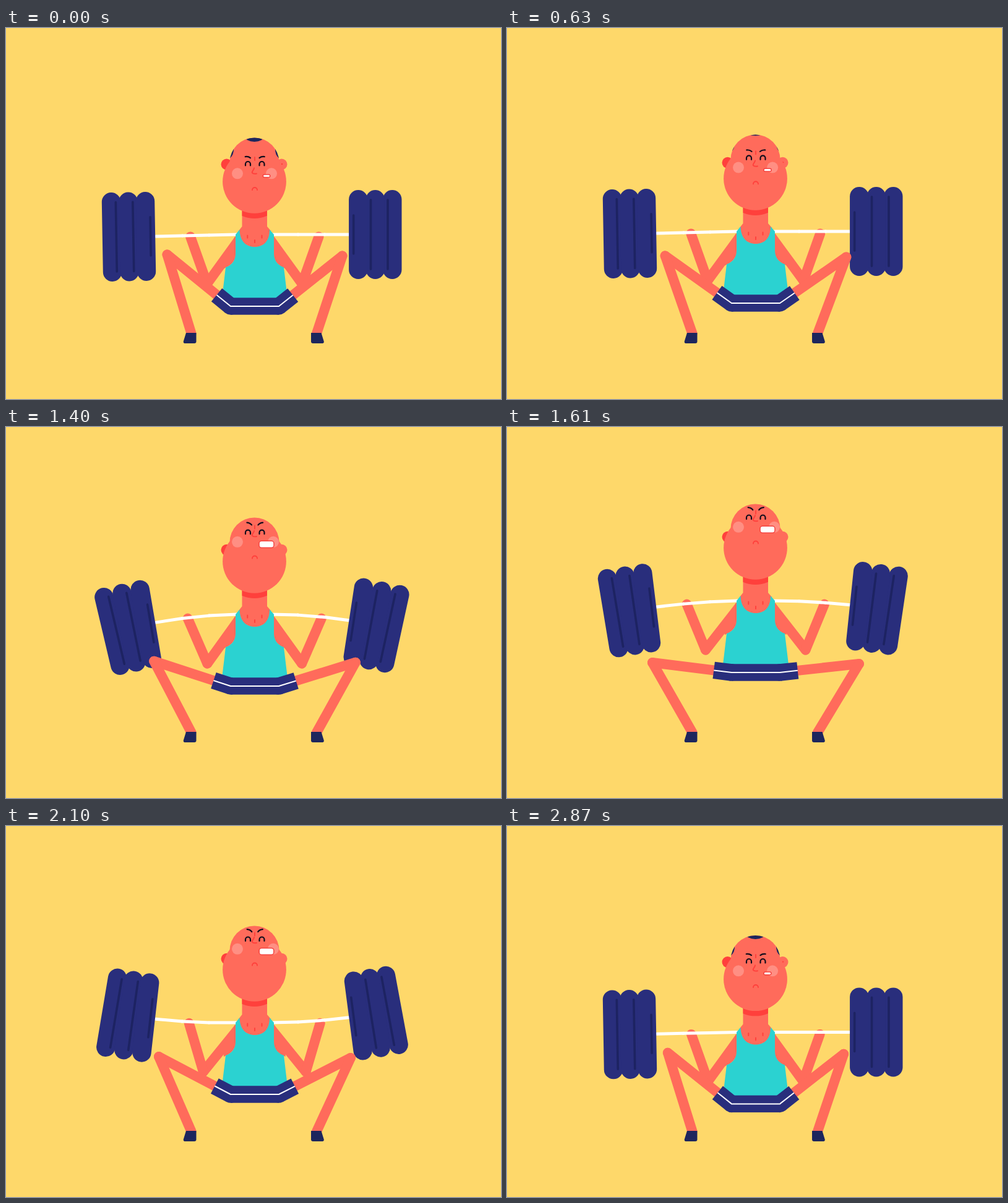
An HTML page without scripts for the animation above (2940 ms loop, 800x600 px).

```html
<!DOCTYPE html>
<html lang="en">
<head>
<meta charset="utf-8">
<title>Squat</title>
<style>
/* y: body height, a: bar bend in degrees, p: head tilt, g: grit of the teeth */
@property --y { syntax: "<number>"; inherits: true; initial-value: 0; }
@property --a { syntax: "<number>"; inherits: true; initial-value: 0; }
@property --p { syntax: "<number>"; inherits: true; initial-value: 0; }
@property --g { syntax: "<number>"; inherits: true; initial-value: 0; }

html, body { margin: 0; width: 100%; height: 100%; overflow: hidden; background: #fed86a; }
svg {
  display: block; width: 100%; height: 100%;
  animation: squat 2940ms -2ms infinite, strain 2940ms -2ms infinite;
}

/* One step lasts 70 ms. */
@keyframes squat {
  0%       { --y: 0;    --a: 0;     animation-timing-function: steps(9); }
  21.428%  { --y: -5;   --a: 0;     animation-timing-function: steps(3); }
  28.571%  { --y: -7;   --a: 0;     animation-timing-function: steps(4); }
  38.095%  { --y: -4;   --a: 2.2;   animation-timing-function: steps(2); }
  42.857%  { --y: -11;  --a: 7;     animation-timing-function: steps(2); }
  47.619%  { --y: -31;  --a: 10.2;  animation-timing-function: steps(2); }
  52.38%   { --y: -49;  --a: 8.6;   animation-timing-function: steps(1); }
  54.761%  { --y: -53;  --a: 7;     animation-timing-function: steps(1); }
  57.142%  { --y: -55;  --a: 4.5;   animation-timing-function: steps(1); }
  59.523%  { --y: -54;  --a: 1;     animation-timing-function: steps(2); }
  64.285%  { --y: -43;  --a: -7;    animation-timing-function: steps(2); }
  69.047%  { --y: -25;  --a: -10.5; animation-timing-function: steps(1); }
  71.428%  { --y: -16;  --a: -8.75; animation-timing-function: steps(2); }
  76.19%   { --y: 1;    --a: -4;    animation-timing-function: steps(1); }
  78.571%  { --y: 7;    --a: -.6;   animation-timing-function: steps(1); }
  80.952%  { --y: 10;   --a: 2.2;   animation-timing-function: steps(1); }
  83.333%  { --y: 10;   --a: 3.2;   animation-timing-function: steps(2); }
  88.095%  { --y: 5;    --a: 1.5;   animation-timing-function: steps(2); }
  92.857%  { --y: 0;    --a: 0;     animation-timing-function: steps(1); }
  95.238%  { --y: -1.2; --a: 0;     animation-timing-function: steps(2); }
  100%     { --y: 0;    --a: 0; }
}
@keyframes strain {
  0%      { --p: 0;   --g: 0;   animation-timing-function: steps(9); }
  21.428% { --p: .23; --g: .06; animation-timing-function: steps(3); }
  28.571% { --p: .36; --g: .3;  animation-timing-function: steps(4); }
  38.095% { --p: .56; --g: 1;   animation-timing-function: steps(4); }
  47.619% { --p: .9;  --g: 1;   animation-timing-function: steps(3); }
  54.761% { --p: 1;   --g: 1;   animation-timing-function: steps(7); }
  71.428% { --p: 1;   --g: .97; animation-timing-function: steps(4); }
  80.952% { --p: .24; --g: .7;  animation-timing-function: steps(3); }
  88.095% { --p: .1;  --g: .25; animation-timing-function: steps(4); }
  97.619% { --p: .02; --g: .03; animation-timing-function: steps(1); }
  100%    { --p: 0;   --g: 0; }
}

.skin { fill: #ff6b5b; }
.red { fill: #ff403c; }
.navy { fill: #292e7c; }
.dark { fill: #1d265d; }
.teal { fill: #2bd2d1; }
.blush { fill: #ff8f83; }
.ink, .mark, .white, .groove { fill: none; stroke-linecap: round; stroke-linejoin: round; }
.ink { stroke: #120d1c; stroke-width: 2.2; }
.mark { stroke: #ff403c; stroke-width: 1.9; }
.white { stroke: #fff; stroke-width: 2; }
.groove { stroke: #1d2362; stroke-width: 3.6; }

.body { transform: translateY(calc(var(--y) * 1px)); }

/* A rounded limb from (x1, y1) to (x2, y2), w thick */
.bone {
  --w: 16;
  --dx: calc(var(--x2) - var(--x1));
  --dy: calc(var(--y2) - var(--y1));
  x: calc(var(--w) * -.5px);
  y: calc(var(--w) * -.5px);
  rx: calc(var(--w) * .5px);
  width: calc((hypot(var(--dx), var(--dy)) + var(--w)) * 1px);
  height: calc(var(--w) * 1px);
  transform: translate(calc(var(--x1) * 1px), calc(var(--y1) * 1px)) rotate(atan2(var(--dy), var(--dx)));
}

.arm {
  --ex: calc(325 + var(--y) * .136 + var(--a) * .45);
  --hx: calc(298 + var(--y) * .14);
  --hy: calc(337.5 + var(--a) * .3);
}
.upper { --x1: 376; --y1: 343; --x2: var(--ex); --y2: 413.5; }
.fore { --x1: var(--ex); --y1: 413.5; --x2: var(--hx); --y2: var(--hy); }

.rod {
  --w: 5;
  fill: #fff;
  --y1: calc(334 + var(--a) * var(--k1));
  --y2: calc(334 + var(--a) * var(--k2));
}
.disc {
  transform: translate(calc(var(--x) * 1px), calc(var(--a) * var(--k) * 1px)) rotate(calc(var(--a) * var(--r) * -1deg));
}

/* The knee swings out and down as the hips rise. */
.leg {
  --hip: calc(450 + var(--y));
  --kx: calc(260.5 + var(--y) * (1.15 + (var(--y) - 10) * (.01178 + (var(--y) + 16) * .0000314)));
  --ky: calc(366.5 + var(--drop) + var(--y) * ((var(--y) - 10) * (.00409 + (var(--y) + 16) * .000122) - .3));
}
.thigh { --x1: 363; --y1: var(--hip); --x2: var(--kx); --y2: var(--ky); }
.shin { --x1: var(--kx); --y1: var(--ky); --x2: var(--foot); --y2: 494; }
.cuff {
  transform: translate(363px, calc(var(--hip) * 1px)) rotate(atan2(var(--ky) - var(--hip), var(--kx) - 363));
}

.face { transform: translateY(calc(var(--p) * -20.5px)); }
.ears { transform: translateY(calc(var(--p) * 10.3px)); }
.nose { transform: translateY(calc(var(--p) * -10px)); }
.brow { transform: translate(calc(391px + var(--p) * 2.7px), calc(208.7px - var(--p) * 3.5px)) rotate(calc(var(--p) * 14deg)); }
.cheek { transform: translateX(calc(var(--g) * 3px)); }
.teeth {
  --tw: calc(11.5px + var(--g) * 12.5px);
  --th: calc(4.5px + var(--g) * 6.5px);
  width: var(--tw); height: var(--th);
  x: calc(var(--tw) * -.5); y: calc(var(--th) * -.5);
  rx: calc(2.2px + var(--g) * 1.8px);
  fill: #fff; stroke: #f5433f; stroke-width: 1.5;
}
</style>
</head>
<body>
<svg viewBox="0 0 800 600">
  <defs>
    <g id="arm" class="arm skin">
      <rect class="bone upper"/>
      <rect class="bone fore"/>
      <path d="M372 335 V365 C371 378 362 385 352 389 L350 368 Z"/>
    </g>
    <g id="rod">
      <rect class="bone rod" style="--w:5;--x1:390;--k1:0;--x2:372;--k2:0"/>
      <rect class="bone rod" style="--w:5;--x1:372;--k1:0;--x2:328;--k2:.11"/>
      <rect class="bone rod" style="--w:5;--x1:328;--k1:.11;--x2:285;--k2:.45"/>
      <rect class="bone rod" style="--w:5;--x1:285;--k1:.45;--x2:242;--k2:1"/>
    </g>
    <rect id="disc" class="navy" x="-15.2" y="-72" width="30.4" height="144" rx="15.2"/>
    <g id="weights">
      <g class="disc" style="--x:-27.5;--k:2.3;--r:1.2"><use href="#disc"/><path class="groove" d="M7.3 -56 V56"/></g>
      <g class="disc" style="--x:0;--k:1.78;--r:1.03"><use href="#disc"/><path class="groove" d="M7.3 -56 V56"/></g>
      <g class="disc" style="--x:27.5;--k:1.26;--r:.85"><use href="#disc"/><path class="groove" d="M7.6 -31 V31"/></g>
    </g>
    <g id="leg" class="leg">
      <rect class="bone thigh skin"/>
      <rect class="bone shin skin"/>
      <g class="cuff">
        <circle class="navy" r="13.75"/>
        <rect class="navy" y="-13.75" width="29" height="27.5"/>
        <path class="white" style="stroke-linecap:butt" d="M0 0 H29"/>
      </g>
    </g>
    <path id="shoe" class="dark" d="M291 493 H307.5 V507 Q307.5 510 304.5 510 H290 Q285.6 510 287 506 Z"/>
    <g id="eye" class="ink">
      <path d="M387 222.5 V220 a4 4 0 0 1 8 0 V222.5"/>
      <path class="brow" d="M-4.3 -.6 Q.5 -1.4 4 1.4"/>
    </g>
    <path id="sideburn" class="dark" d="M352 190 L368 194 Q368.5 205 362 210.5 H352 Z"/>
    <g id="skull"><circle cx="401.5" cy="217.5" r="40"/><circle cx="401.5" cy="248.3" r="51.4"/></g>
    <clipPath id="inHead"><circle cx="401.5" cy="217.5" r="40"/><circle cx="401.5" cy="248.3" r="51.4"/></clipPath>
    <clipPath id="inNeck"><rect x="381.5" y="270" width="40.5" height="60"/></clipPath>
  </defs>

  <g class="body">
    <use href="#arm"/>
    <use href="#arm" transform="matrix(-1 0 0 1 803.5 0)"/>
    <g transform="translate(372 0) skewY(-1.3) translate(-372 0)"><use href="#rod"/></g>
    <use href="#rod" transform="matrix(-1 0 0 1 800 0)"/>
    <use href="#weights" transform="translate(198.5 337.5) rotate(-1)"/>
    <use href="#weights" transform="translate(596.8 334) scale(-1 1)"/>

    <path class="skin" d="M381.5 280 H422 V321 L428 328 V345 L402 357 L376 345 V328 L381.5 321 Z"/>
    <path class="teal" d="M377.5 326 C378 345 388 354 402 354 S426 345 426 326 L433 334 V365 C433 378 442 385 449 387 L455 437 H349 L355 387 C362 385 371 378 371 365 V334 Z"/>
    <path class="mark" d="M390.3 335.5 V339.5 M413.5 335.5 V339.5 M402 343 V347"/>

    <g clip-path="url(#inNeck)"><circle class="red" cx="401.5" cy="256.5" r="51.4"/></g>
    <g class="ears">
      <circle class="red" cx="356.5" cy="220.5" r="9"/>
      <circle class="skin" cx="445.5" cy="220.5" r="9"/>
      <circle class="red" cx="446" cy="220" r="1.2"/>
    </g>
    <use href="#skull" class="skin"/>
    <g clip-path="url(#inHead)">
      <g class="face">
        <ellipse class="dark" cx="401.5" cy="175" rx="16" ry="9"/>
        <use href="#sideburn"/>
        <use href="#sideburn" transform="matrix(-1 0 0 1 803 0)"/>
      </g>
    </g>
    <g class="face">
      <circle class="blush" cx="374" cy="235.3" r="9"/>
      <circle class="blush cheek" cx="429" cy="235.3" r="9"/>
      <path class="mark" d="M402 209 V214"/>
      <path class="mark nose" d="M401 226.5 C400.5 230 397.5 231 397.7 234 Q399.5 236.5 405 235.5"/>
      <path class="mark" d="M398 262 a4 4 0 0 1 8 0"/>
      <use href="#eye"/>
      <use href="#eye" transform="matrix(-1 0 0 1 804.5 0)"/>
      <g transform="translate(421 239.3)"><rect class="teeth"/></g>
    </g>
  </g>

  <use href="#leg" style="--foot:299.5;--drop:0"/>
  <use href="#leg" style="--foot:302;--drop:2" transform="matrix(-1 0 0 1 804 0)"/>
  <g class="body">
    <rect class="navy" x="363" y="436.25" width="78" height="27.5"/>
    <path class="white" d="M363 450 H441"/>
  </g>
  <use href="#shoe"/>
  <use href="#shoe" transform="matrix(-1 0 0 1 800.5 0)"/>
</svg>
</body>
</html>
```
